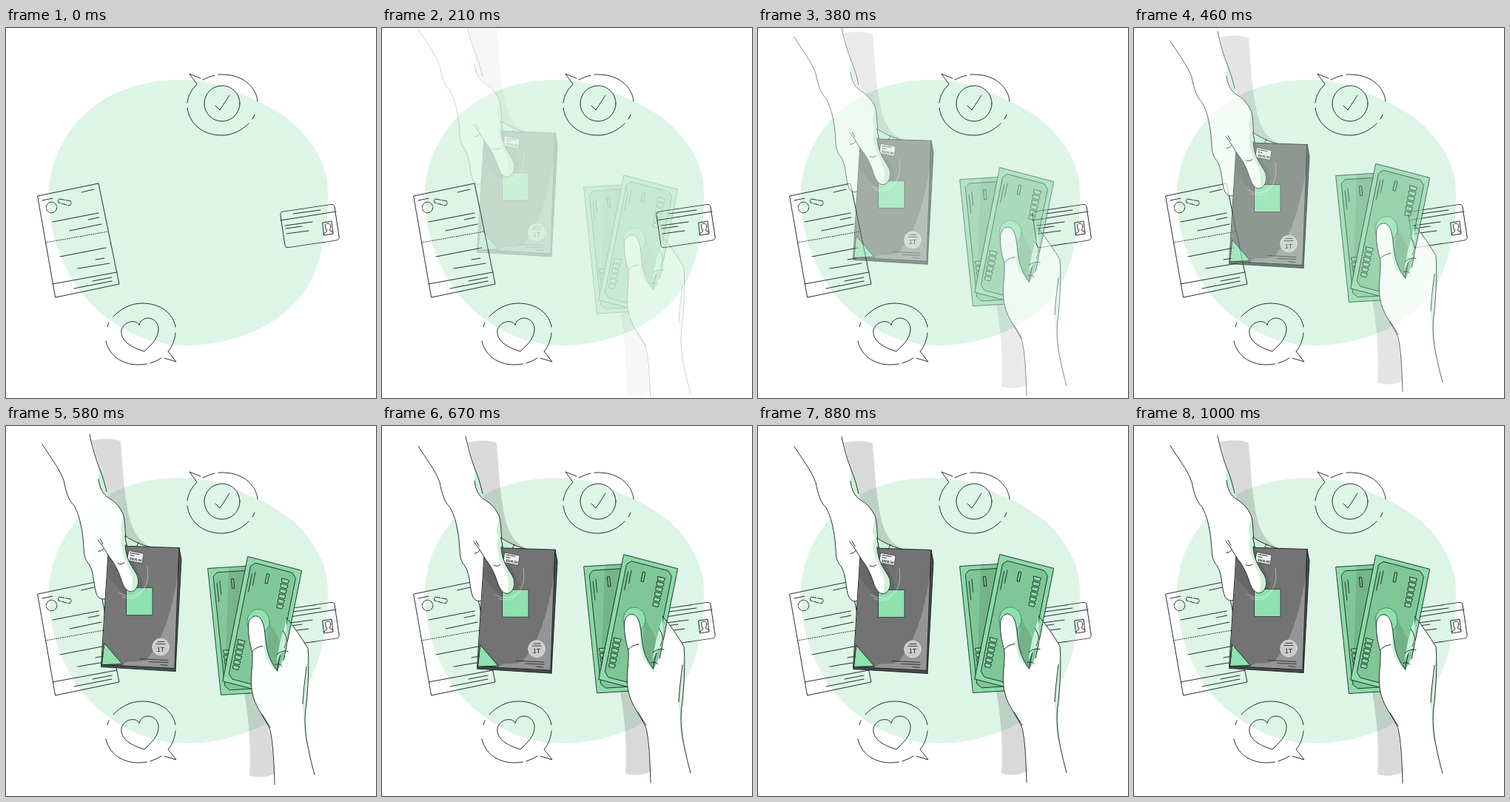
An HTML page for the animation above (1.04 s loop, 500 px wide and 500 px high).

```html
<!DOCTYPE html>
<html lang="en">
<head>
<meta charset="utf-8">
<title>Hand-over</title>
<style>
html, body { margin: 0; height: 100%; overflow: hidden; background: #fff }
svg { display: block; width: 100vw; height: 100vh }
.line { fill: none }
.plain { stroke: none }
.white { fill: #fff }
.mint { fill: #c9f2d8 }
.green { fill: #8de2ae }
.shade { fill: #000; stroke: none }
text { font-family: "Liberation Sans", Arial, sans-serif; fill: #222; stroke: none }
</style>
</head>
<body>
<svg viewBox="0 0 500 500" stroke="#1c2424" stroke-width=".95" stroke-linecap="round" stroke-linejoin="round">
  <defs>
    <g id="bill" stroke="#1c2f27" stroke-width=".9">
      <path fill="#8bdba8" d="M0 0H75V172H0Z"/>
      <path fill="#7fc697" d="M12 6H63L69 12V160L63 166H12L6 160V12Z"/>
      <path class="line" d="M10 21V46M14 18V36M30 16h3v13h-3Z"/>
      <g id="marks" fill="#8bdba8"></g>
    </g>
  </defs>

  <path class="plain" fill="#ddf5e6" d="M235 70C275 70 305 82 340 99C400 125 435 175 435 222C435 262 430 300 415 335C385 400 310 429 240 429C178 428 125 392 94 347C72 312 58 272 58 228C58 148 121 70 235 70Z"/>

  <!-- speech bubbles -->
  <g class="line">
    <path d="M263 68L248 62L258 76C250 84 246 92 245 101M245 108C248 130 266 145 292 145C306 145 319 138 328 129M333 123Q335 120 336 117M340 99C338 78 318 61 287 63M282 64Q273 66 266 70"/>
    <circle cx="292" cy="102" r="24"/>
    <path d="M283 105L289 111L302 91"/>
    <path d="M214 446L230 451L219 437C225 430 228 422 229 412M229 404C226 385 208 372 184 372C168 372 154 380 145 390M139 398Q138 401 137 404M135 423C139 442 156 455 179 455Q185 455 190 454M195 453Q204 450 210 446"/>
    <path d="M180 401C175 393 160 396 156 408C154 424 171 432 187 437C196 428 207 419 206 405C204 390 184 387 180 401Z"/>
  </g>

  <!-- receipt -->
  <g class="line">
    <path d="M43 227L125 210L153 346L67 364ZM49 233L63 230M102 222L119 218M63 262L125 250M111 259L126 256M86 274L129 265M73 309L135 297M121 313L133 311M97 325L140 318M63 346L150 330M117 342L143 337M92 352L143 342"/>
    <path d="M53 290L138 275" stroke-dasharray="1 2"/>
    <circle cx="61.500" cy="242.500" r="7.300" stroke-dasharray="6 1.500"/>
    <path d="M72 231L88 234Q89 237 86 240L71 236Q69 233 72 231Z" stroke-dasharray="7 2"/>
  </g>

  <!-- card -->
  <g class="line">
    <rect x="-37" y="-24.500" width="74" height="49" rx="4" transform="translate(410.500 267.500) rotate(-8.500)"/>
    <path d="M371 260L446 248M388 251L425 246M377 267L414 262M378 271L400 268M379 278L409 274M428 263L440 261L442 278L430 280Z"/>
    <path d="M430 278L434 274C430 268 431 264 435 264C439 264 440 269 437 273L442 276"/>
  </g>

  <g id="giver">
    <path class="shade" fill-opacity=".15" d="M116 23Q140 18 155 24C157 50 159 85 163 108C167 135 174 155 192 165H160L130 75Z"/>
    <path class="plain white" d="M49 28C58 43 72 60 78 77C81 92 84 103 92 111C99 124 102 138 104 155C106 175 104 180 112 190C120 202 118 222 123 232Q127 239 134 237L145 200L164 168C160 150 162 132 158 122Q152 108 138 99C136 86 131 72 126 60C121 47 117 33 113 15Z"/>
    <path class="plain mint" d="M125 75C126 86 131 96 138 100C136 86 131 72 126 60Z"/>
    <path class="plain mint" d="M159 125C153 140 152 158 158 173L166 170C160 150 162 136 159 125Z"/>
    <path class="line" d="M49 28C58 43 72 60 78 77C81 92 84 103 92 111C99 124 102 138 104 155C106 175 104 180 112 190C120 202 118 222 123 232Q127 239 134 237"/>
    <path class="line" d="M113 15C117 33 121 47 126 60C131 72 133 80 136 92M125 75C126 86 131 96 138 100Q152 108 158 122C162 132 160 150 164 168"/>
    <path class="mint" d="M161 152C170 158 182 164 195 167H164Z"/>
    <path class="line" d="M179 161L176 167"/>

    <!-- box -->
    <path fill="#737373" d="M139 165L234 168L228 331L129 326Z"/>
    <path class="plain" fill="#959595" d="M233 200C225 245 216 288 190 319C175 325 165 318 157 327L228 331Z"/>
    <path class="plain" fill="#676767" d="M139 167H164L185 215L180 228L160 232L136 205Z"/>
    <path fill="#454c51" d="M234 168L237 184L229 335L228 331Z"/>
    <path fill="#454c51" d="M129 326L228 331L229 335L129 329Z"/>
    <path class="green" d="M133 297L157 325L130 326Z"/>
    <rect class="green" x="163" y="222" width="35" height="37" stroke-width=".7"/>
    <path class="line" stroke="#fff" stroke-opacity=".45" d="M191 193C194 212 189 224 178 232M153 229Q172 240 187 224M157 234Q168 238 178 234"/>
    <path fill="#f4f4f4" stroke-width=".6" d="M166 172L186 176L184 189L164 185Z"/>
    <path class="line" d="M168 175L180 177M168 178L173 179"/>
    <text x="167" y="184" font-size="4.600" font-weight="bold" transform="rotate(10 167 184)">$500.00</text>
    <circle cx="209" cy="302" r="11.300" fill="#cacaca" stroke="#eee" stroke-width=".8"/>
    <path class="line" stroke-width=".8" d="M205 295H214M203 298H215M181 318L219 320M194 322L219 323M209 326L218 327"/>
    <text x="209" y="308" font-size="9" text-anchor="middle">1T</text>

    <!-- thumb -->
    <path class="plain white" d="M124 157C130 164 135 173 140 181C149 192 153 203 156 212C160 224 166 230 173 226C180 221 180 210 176 203C168 190 160 180 161 160L150 130Z"/>
    <path class="plain mint" d="M158 150C152 163 158 178 165 193C171 203 173 214 169 227C180 224 182 212 176 203C168 190 162 182 161 164Z"/>
    <path class="line" d="M124 157C130 164 135 173 140 181C149 192 153 203 156 212C160 224 166 230 173 226C180 221 180 210 176 203C168 190 162 182 161 164M127 156L131 163M125 173Q129 173 132 169M151 189Q156 192 160 188"/>
  </g>

  <g id="payer">
    <path class="shade" fill-opacity=".15" d="M320 345C326 380 332 420 329 469Q349 474 363 466L358 415L336 350Z"/>
    <path class="plain white" d="M379 256C390 268 400 284 408 297C410 320 408 350 406 372C402 395 405 415 409 435L417 468L363 481C362 450 361 420 355 400L345 340L367 310Z"/>

    <use href="#bill" transform="matrix(.998 -.06 .104 .994 273 189)"/>
    <path class="shade" fill-opacity=".09" d="M301 188L325 187L296 338L297 300Z"/>
    <use href="#bill" transform="matrix(.968 .252 -.197 .98 327 173)"/>
    <path class="shade" fill-opacity=".1" d="M355 258C362 272 372 285 375 305L366 335L352 300Z"/>
    <ellipse class="green" cx="341" cy="261" rx="15" ry="17" stroke="#2e7a50" stroke-width=".8"/>

    <!-- thumb and palm -->
    <path class="plain white" d="M363 481C362 450 361 425 357 408C352 394 338 378 334 362C328 340 334 325 333 303C329 290 326 272 328 262C331 252 341 250 346 260C351 270 350 290 354 303Q358 317 367 328L374 314L395 300L402 380Z"/>
    <path class="plain mint" d="M346 260C351 270 350 290 354 303Q358 317 367 328C357 320 350 312 349 296Q350 275 346 260Z"/>
    <path class="plain mint" d="M379 258L370 290L365 318Q369 305 376 300L380 290Z"/>
    <path class="plain mint" d="M408 310L406 325L401 372L404 420L409 435C405 415 402 395 406 372Q409 340 408 310Z"/>
    <path class="line" d="M363 481C362 450 361 425 357 408C352 394 338 378 334 362C328 340 334 325 333 303C329 290 326 272 328 262C331 252 341 250 346 260C351 270 350 290 354 303Q358 317 367 328"/>
    <path class="line" d="M379 256C390 268 400 284 408 297C410 320 408 350 406 372C402 395 405 415 409 435Q412 450 417 468M406 322C404 340 402 352 401 372M346 386L357 404M333 301Q338 295 347 294M374 273C380 280 381 288 376 296M366 305Q374 299 381 301M364 319Q370 317 373 321"/>
  </g>
</svg>
<script>
const $ = id => document.getElementById(id);

// two stacks of small numerals on each note
const stack = (x, y) => Array.from({ length: 6 }, (_, i) =>
  `<path d="M${x + i * .2} ${y + i * 7}h${10 - i * .4}l-1 5h-${8 - i * .2}Z"/>`).join("");
$("marks").innerHTML = stack(51, 17) + stack(9, 112);

const LOOP = 1040, STEP = 41.6;

// distance from the resting pose at a given step
function gap(k) {
  if (k < 11) return 10.5 + 2.6 * (11 - k);
  if (k < 18) return 10.5 * ((18 - k) / 7) ** 2;
  return 1.5 * ((k - 18) / 6) ** 1.5;
}

function draw(now) {
  const k = Math.min(24, Math.floor((now % LOOP + 3) / STEP));
  const alpha = Math.max(0, Math.min(1, (k - 2.4) / 12));
  for (const [id, dir] of [["giver", -1], ["payer", 1]]) {
    const part = $(id);
    part.setAttribute("transform", `translate(0 ${dir * gap(k)})`);
    part.setAttribute("opacity", alpha);
  }
  requestAnimationFrame(draw);
}
draw(0);
</script>
</body>
</html>
```
